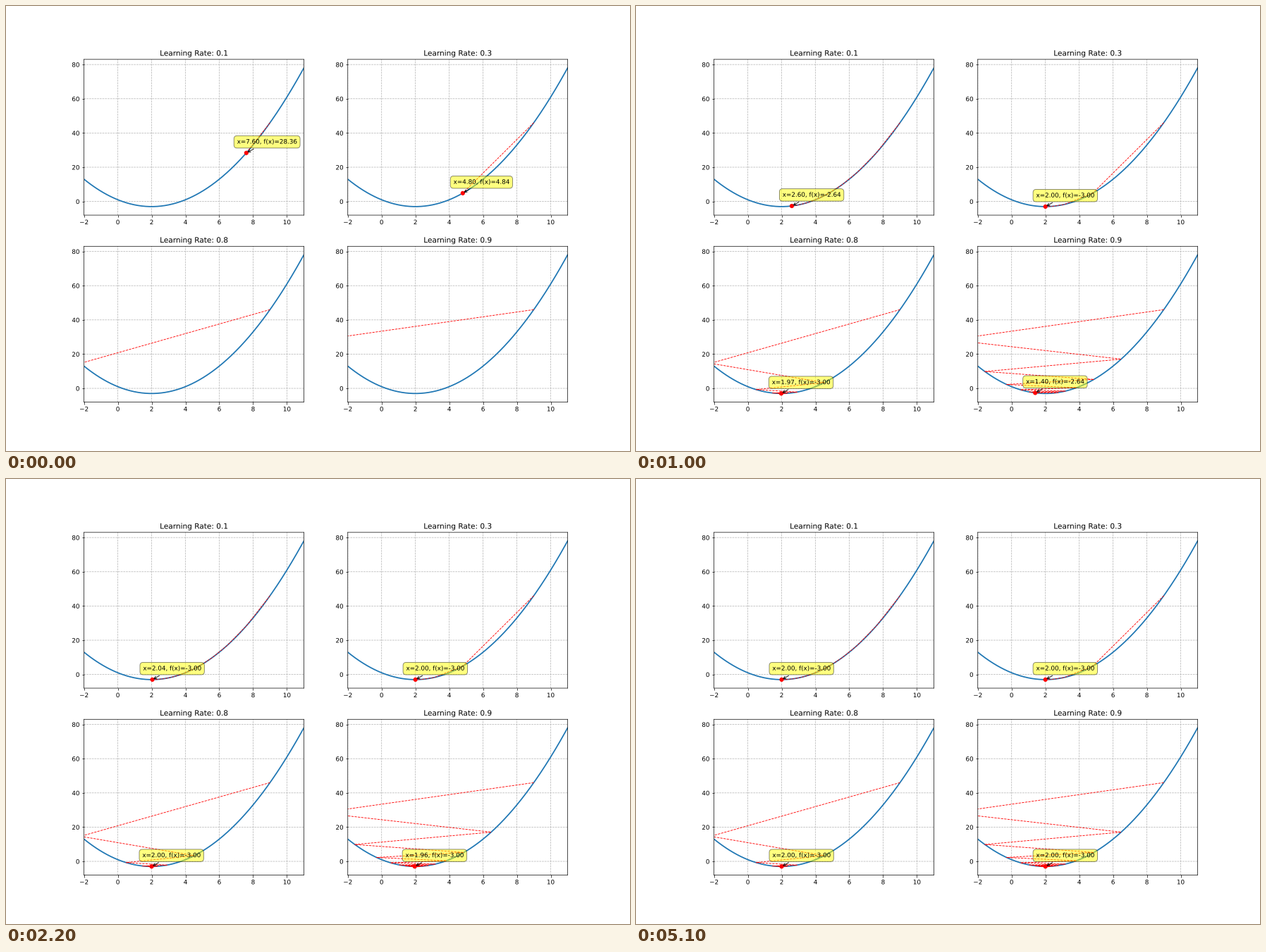
Recreate the animation shown at these times as a matplotlib script. Size 885 by 632 pixels, loop 9.9 s.

```python
import matplotlib.pyplot as plt
import numpy as np
from matplotlib import patheffects
from matplotlib.animation import FuncAnimation

W, H, DPI = 885, 632, 63.2
RATES = (0.1, 0.3, 0.8, 0.9)
START = 9.0
FRAMES, INTERVAL = 99, 100

# Unsnapped vector drawing keeps text and lines at sub-pixel positions.
plt.rcParams.update({
    "font.family": "DejaVu Sans",
    "text.hinting": "none",
    "path.snap": False,
    "path.effects": [patheffects.Normal()],
})


def f(x):
    return (x - 2) ** 2 - 3


def grad(x):
    return 2 * (x - 2)


def descend(rate):
    xs = [START]
    for _ in range(FRAMES):
        xs.append(xs[-1] - rate * grad(xs[-1]))
    return np.array(xs)


class Panel:
    """One parabola with its descent path, current point and label."""

    def __init__(self, ax, rate):
        self.xs = descend(rate)
        self.ys = f(self.xs)
        grid = np.linspace(-2, 11, 400)
        ax.plot(grid, f(grid), lw=2)
        self.path, = ax.plot([], [], "r--", lw=1)
        self.dot, = ax.plot([], [], "ro", ms=6)
        self.label = ax.annotate(
            "", xy=(START, f(START)), xytext=(-15, 15),
            textcoords="offset points", fontsize=10,
            bbox=dict(boxstyle="round,pad=0.5", fc="yellow", alpha=0.5),
            arrowprops=dict(arrowstyle="->", connectionstyle="arc3,rad=0"))
        ax.set(xlim=(-2, 11), ylim=(-8, 83), title=f"Learning Rate: {rate}")
        ax.grid(True, linestyle="--")

    def show(self, step):
        x, y = self.xs[step], self.ys[step]
        self.path.set_data(self.xs[:step + 1], self.ys[:step + 1])
        self.dot.set_data([x], [y])
        self.label.xy = (x, y)
        self.label.set_text(f"x={x:.2f}, f(x)={y:.2f}")
        return self.path, self.dot, self.label


# The tiny margin keeps the pixel size from being truncated.
fig, axes = plt.subplots(
    2, 2, figsize=((W + 1e-6) / DPI, (H + 1e-6) / DPI), dpi=DPI)
panels = [Panel(ax, rate) for ax, rate in zip(axes.flat, RATES)]


def update(frame):
    return [artist for p in panels for artist in p.show(frame + 1)]


anim = FuncAnimation(fig, update, frames=FRAMES, interval=INTERVAL,
                     init_func=lambda: update(0), repeat=True,
                     repeat_delay=0, blit=False)
plt.show()
```
